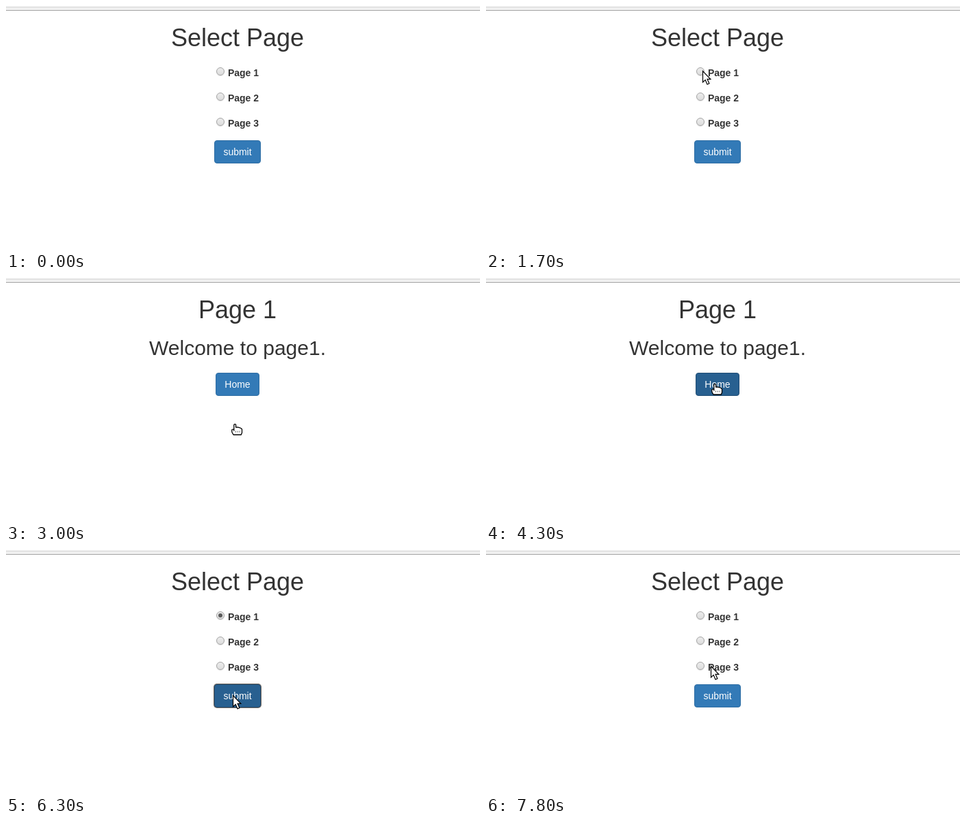
Write an HTML page that moves like this. It is 692 px wide and 358 px high and loops after 8000 ms.

```html
<!DOCTYPE html>
<html lang="en">
<head>
<meta charset="utf-8">
<title>Select Page</title>
<style>
html, body { margin: 0; width: 100%; height: 100%; overflow: hidden; background: #fff; }
#stage { position: relative; width: 692px; height: 358px; overflow: hidden; color: #333;
  font: 14px/20px "Liberation Sans", Arial, sans-serif; }
#stage * { box-sizing: border-box; }
.bar { position: absolute; left: 0; top: 1px; width: 692px; height: 6px; background: #f0f0f0;
  border-top: 1px solid #d2d2d2; border-bottom: 1px solid #a5a5a5; }
.screen { position: absolute; left: 0; top: 0; width: 676px; height: 358px; text-align: center; }
h1, h2 { position: absolute; left: 0; width: 100%; margin: 0; font-weight: 400; line-height: 1.1; white-space: nowrap; }
h1 { top: 27px; font-size: 36px; }
h2 { top: 86px; font-size: 30px; }
.radio { position: absolute; left: 307px; height: 20px; }
.radio b { position: absolute; left: 16.9px; top: 0; white-space: nowrap; }
.radio i { position: absolute; left: 0; top: 2px; width: 12px; height: 12px; border-radius: 50%;
  border: 1px solid #a3a3a3; background: linear-gradient(#ececec, #dcdcdc); box-shadow: 0 1px 1px rgba(0,0,0,.1); }
.radio i.down { background: #cfcfcf; border-color: #959595; }
.radio i.on::after { content: ""; position: absolute; left: 2px; top: 2px; width: 6px; height: 6px;
  border-radius: 50%; background: #5a5a5a; }
.btn { position: absolute; height: 34px; padding: 6px 0; border: 1px solid #2e6da4; border-radius: 4px;
  background: #337ab7; color: #fff; }
.btn.hover { background: #286090; border-color: #204d74; }
.btn.down { background: #204d74; border-color: #122b40; }
.btn.focus { box-shadow: 0 0 0 1px #6b6560; }
#submit { left: 304px; top: 197px; width: 68px; }
#home { left: 306px; top: 139px; width: 64px; }
svg { position: absolute; left: 0; top: 0; overflow: visible; fill: #fff; stroke: #000; }
</style>
</head>
<body>
<div id="stage">
  <div class="bar"></div>
  <div class="screen" id="select">
    <h1>Select Page</h1>
    <div class="radio" style="top:88px"><i id="dot"></i><b>Page 1</b></div>
    <div class="radio" style="top:125px"><i></i><b>Page 2</b></div>
    <div class="radio" style="top:162px"><i></i><b>Page 3</b></div>
    <div class="btn" id="submit">submit</div>
  </div>
  <div class="screen" id="page">
    <h1>Page 1</h1>
    <h2 id="welcome">Welcome to page1.</h2>
    <div class="btn" id="home">Home</div>
  </div>
  <svg width="20" height="24" id="cursor">
    <path id="arrow" stroke-width="1.2" d="M.5 .6V16.8L4.2 13.4 7 19.9 9.9 18.7 7.1 12.3H11.8Z"/>
    <g id="hand" transform="translate(-2 -.5)">
      <path stroke-width="1.3" stroke-linejoin="round" d="M3.8 11V1.8Q5.2 -.2 6.6 1.8V5.6L9.2 5.4 12 6.2 14.2 7 15.5 8.4V13.5L14.3 16.5H3L.8 12.5V9L2.4 8.5 3.8 9.5"/>
      <path fill="none" stroke="#555" d="M6.5 11V13M9.3 11V13M12.1 11V13"/>
    </g>
  </svg>
</div>
<script>
const LOOP = 8000, STEP = 100;
const $ = id => document.getElementById(id);

// Pointer moves; it rests between them.
const entry = { x: 344, y: 311 };
const moves = [
  { from: 200, to: 600, x: 332, y: 220 },
  { from: 700, to: 1400, x: 314, y: 94 },
  { from: 1600, to: 1800, x: 317, y: 96 },
  { from: 2100, to: 2400, x: 331, y: 214 },
  { from: 3600, to: 4000, x: 331, y: 155 },
  { from: 4600, to: 5100, x: 304, y: 95 },
  { from: 5100, to: 5300, x: 316, y: 98 },
  { from: 5600, to: 5900, x: 331, y: 213 },
  { from: 6500, to: 7100, x: 331, y: 155 },
  { from: 7400, to: 7800, x: 328, y: 170 }
];

// Each visit: tick the radio, press submit, page loads, press home, return.
const visits = [
  { pick: 2000, send: 2600, load: 2900, leave: 4200, back: 4400, welcome: true },
  { pick: 5500, send: 6100, load: 6500, leave: 7200, back: 7400, welcome: false }
];

const ease = u => u * u * (3 - 2 * u);
const within = (t, a, b) => t >= a && t < b;
const show = (id, on) => { $(id).style.visibility = on ? "visible" : "hidden"; };
const mark = (id, states) => {
  for (const name in states) $(id).classList.toggle(name, states[name]);
};

function pointerAt(t) {
  let { x, y } = entry, moving = false;
  for (const m of moves) {
    if (t <= m.from) break;
    const s = ease(Math.min(1, (t - m.from) / (m.to - m.from)));
    x += (m.x - x) * s;
    y += (m.y - y) * s;
    moving = t <= m.to;
  }
  return { x: Math.round(x), y: Math.round(y), moving };
}

function over(id, p) {
  const { offsetLeft: l, offsetTop: t, offsetWidth: w, offsetHeight: h } = $(id);
  return within(p.x, l, l + w) && within(p.y, t, t + h);
}

const boxes = ["submit", "home"];

function render(t) {
  const v = visits.find(k => t < k.back) || visits[0];
  const active = t < v.back;
  const onPage = active && t >= v.load;
  const shown = onPage ? "home" : "submit";
  const p = pointerAt(t);

  show("select", !onPage);
  show("page", onPage);
  for (const id of ["submit", "dot"]) $(id).style.visibility = "inherit";
  show("welcome", onPage && v.welcome);

  const hover = over(shown, p);
  mark("submit", {
    hover: hover && !onPage,
    down: within(t, v.send, v.send + STEP),
    focus: within(t, v.send, v.load)
  });
  mark("home", { hover: hover && onPage, down: within(t, v.leave, v.leave + STEP) });
  mark("dot", { down: within(t, v.pick, v.pick + STEP), on: within(t, v.pick + STEP, v.load) });

  // A resting pointer keeps its shape after the page beneath it changes.
  const waiting = within(t, v.send, v.load);
  const hand = !waiting && (p.moving ? hover : boxes.some(id => over(id, p)));
  const visible = t >= moves[0].from;
  show("arrow", visible && !hand);
  show("hand", visible && hand);
  $("cursor").style.transform = `translate(${p.x}px, ${p.y}px)`;
}

const start = performance.now();
function tick(now) {
  const t = Math.max(0, now - start) % LOOP;
  render(Math.floor(t / STEP) * STEP);
  requestAnimationFrame(tick);
}
render(0);
requestAnimationFrame(tick);
</script>
</body>
</html>
```
